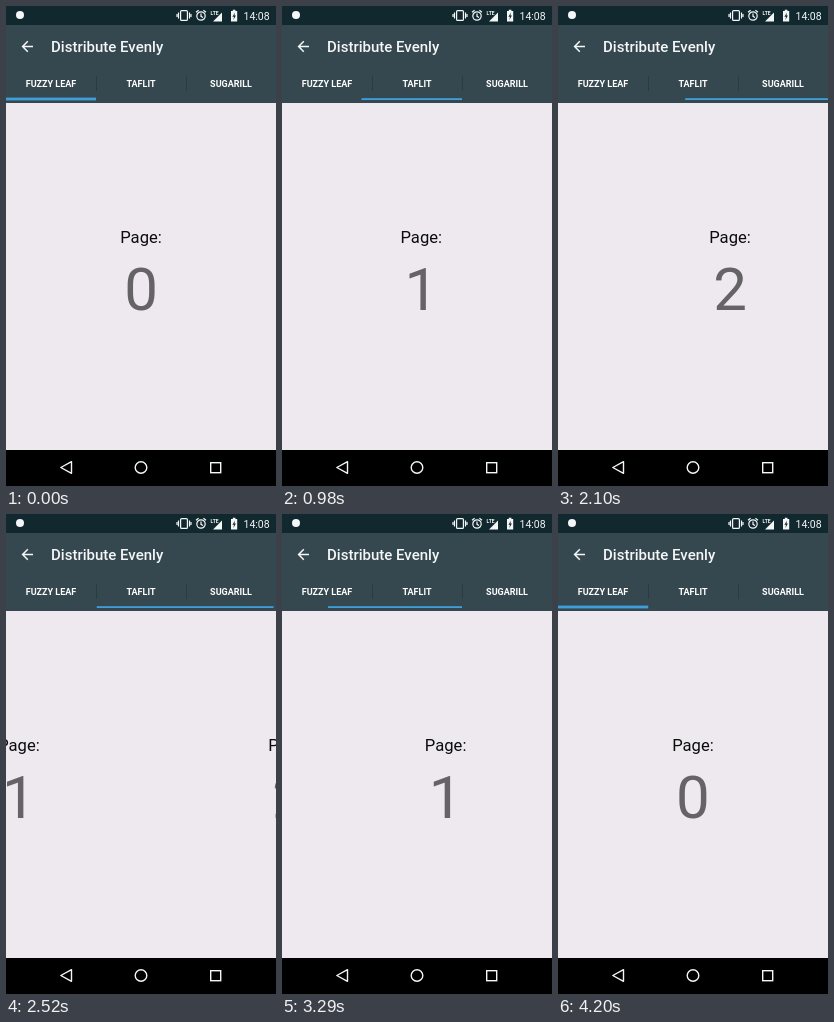
Write an HTML page that moves like this. It is 270x480 px and loops after 4270 ms.

```html
<!DOCTYPE html>
<html lang="en">
<head>
<meta charset="utf-8">
<title>Tab pager</title>
<style>
  html, body { margin: 0; width: 100%; height: 100%; overflow: hidden; background: #000; }
  svg { display: block; width: 270px; height: 480px; font-family: Roboto, sans-serif; }
  .tabs { font-size: 9px; font-weight: 700; fill: #fff; text-anchor: middle; }
  .page { text-anchor: middle; }
  .label { font-size: 16.6px; fill: #0c0c0d; }
  .number { font-size: 60px; fill: #656366; }
  .line { fill: none; stroke: #f4f6f7; }
</style>
</head>
<body>
<svg viewBox="0 0 270 480">
  <rect width="270" height="480" fill="#ede9ee"/>
  <g id="pages"></g>

  <rect width="270" height="97" fill="#36484f"/>
  <rect width="270" height="19" fill="#12282f"/>
  <path d="M90.5 70V85M180.5 70V85" stroke="#2b3b42"/>
  <rect id="indicator" fill="#3f9fda"/>

  <!-- status bar -->
  <g fill="#f4f6f7">
    <circle cx="14" cy="9" r="4"/>
    <path d="M207 15.5L216 6.5V15.5Z"/>
    <path d="M225 5h1.8V3.8h2.6V5h1.8V15.5H225Z"/>
    <path d="M229 6.5L226.4 10.8H228L227.4 14L229.9 9.6H228.4Z" fill="#12282f"/>
    <text x="204.5" y="9" font-size="5" font-weight="700">LTE</text>
    <text x="237.5" y="14" font-size="10.5">14:08</text>
  </g>
  <g class="line" stroke-width="1.2">
    <rect x="174.6" y="4.6" width="6.8" height="9.8" rx="1"/>
    <path d="M172.5 6.5V12.5M183.5 6.5V12.5M171 8V11M185 8V11"/>
    <circle cx="195" cy="10" r="4.2"/>
    <path d="M195 7.4V10.3L197 11.5M190 6.3L192.6 4.2M200 6.3L197.4 4.2"/>
  </g>

  <!-- app bar -->
  <path class="line" stroke-width="1.5" d="M27 40.5H17M21.8 35.3L16.6 40.5L21.8 45.7"/>
  <text x="45" y="46" font-size="15" font-weight="500" fill="#f4f6f7">Distribute Evenly</text>
  <g class="tabs">
    <text x="45" y="81">FUZZY LEAF</text>
    <text x="135" y="81">TAFLIT</text>
    <text x="225" y="81">SUGARILL</text>
  </g>

  <!-- navigation bar -->
  <rect y="444" width="270" height="36"/>
  <g class="line" stroke-width="1.4">
    <path d="M65.5 455.7V467.3L54.8 461.5Z" stroke-linejoin="round"/>
    <circle cx="135" cy="461.5" r="5.8"/>
    <rect x="204.7" y="456.7" width="10" height="10"/>
  </g>
</svg>
<script>
const LOOP = 4270, STEP = 70, PAGE = 270, TAB = 90, SETTLE = 545, LAG = 14;

// Each swipe is a finger drag through [time, position] points, then a settle to `to`.
const swipes = [
  { drag: [[590, 0], [630, .087], [690, .3]], to: 1 },
  { drag: [[1310, 1], [1350, 1.35]], to: 2 },
  { drag: [[2000, 2], [2100, 1.863], [2520, 1.452], [2680, 1.295]], to: 1 },
  { drag: [[3220, 1], [3290, .894], [3780, .33]], to: 0 }
];

const pages = document.getElementById('pages');
const indicator = document.getElementById('indicator');

pages.innerHTML = [0, 1, 2].map(i => `
  <g class="page" transform="translate(${PAGE * (i + .5)})">
    <text class="label" y="237">Page:</text>
    <text class="number" y="304">${i}</text>
  </g>`).join('');

function positionAt(time, lag = 0) {
  const swipe = swipes.filter(s => time >= s.drag[0][0]).pop();
  if (!swipe) return 0;
  const { drag, to } = swipe;
  const [release, from] = drag[drag.length - 1];
  if (time >= release) {
    const u = Math.min(1, Math.max(0, (time - release - lag) / SETTLE));
    return to + (from - to) * (1 - u) ** 5;
  }
  const next = drag.findIndex(([t]) => t > time);
  const [t0, p0] = drag[next - 1], [t1, p1] = drag[next];
  return p0 + (p1 - p0) * (time - t0) / (t1 - t0);
}

function setAttributes(element, attributes) {
  for (const name in attributes) element.setAttribute(name, attributes[name]);
}

function draw(now) {
  const time = Math.floor((now % LOOP + 1) / STEP) * STEP;
  pages.setAttribute('transform', `translate(${-PAGE * positionAt(time)})`);

  // The leading edge decelerates while the trailing edge accelerates.
  const position = positionAt(time, LAG);
  const tab = Math.floor(position), offset = position - tab;
  const left = TAB * (tab + offset ** 6);
  const right = TAB * (tab + 2 - (1 - offset) ** 6);
  const resting = Math.abs(position - Math.round(position)) < .002;
  setAttributes(indicator, {
    x: left,
    width: right - left,
    y: resting ? 91.6 : 92.2,
    height: resting ? 2.8 : 1.8
  });
  requestAnimationFrame(draw);
}
requestAnimationFrame(draw);
</script>
</body>
</html>
```
